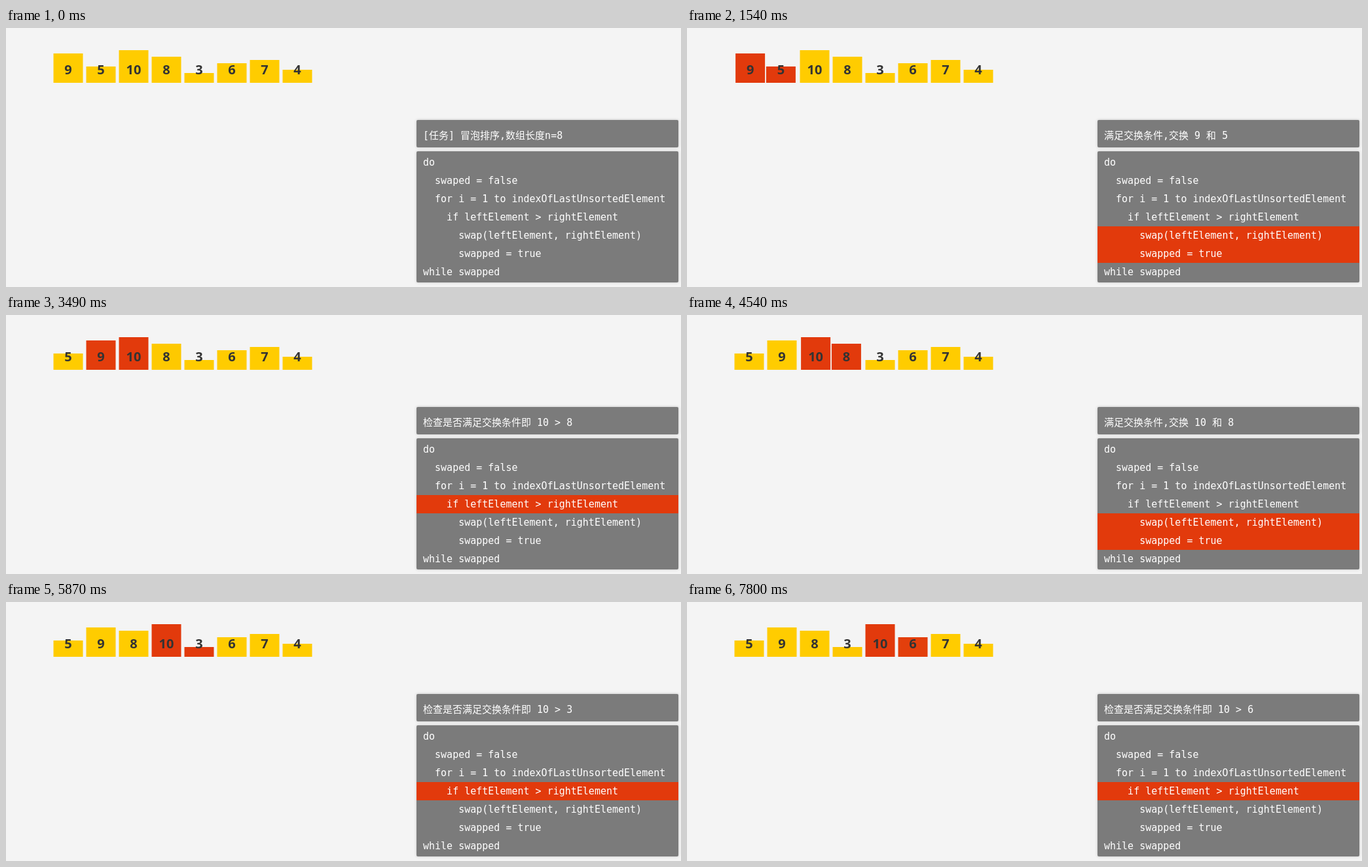
These frames come from a looping animation (1031 px wide and 397 px high, 8 s). An HTML page with a canvas:

```html
<!DOCTYPE html>
<html lang="zh-CN">
<head>
<meta charset="utf-8">
<title>冒泡排序</title>
<style>
  html, body { margin: 0; width: 100%; height: 100%; overflow: hidden; background: #f4f4f4; }
  canvas { display: block; }
</style>
</head>
<body>
<canvas id="stage" width="1031" height="397"></canvas>
<script>
const ctx = document.getElementById('stage').getContext('2d');

const LOOP = 8000;
const EASE_MS = 500;
const VALUES = [9, 5, 10, 8, 3, 6, 7, 4];
const YELLOW = [255, 204, 0];
const RED = [226, 58, 12];
const GREY = '#7b7b7b';
const MONO = '15px "DejaVu Sans Mono", "Noto Sans CJK SC", "Noto Sans CJK", monospace';
const LABEL = 'bold 20px "Open Sans", "Noto Sans", sans-serif';

const CODE = [
  'do',
  '  swaped = false',
  '  for i = 1 to indexOfLastUnsortedElement',
  '    if leftElement > rightElement',
  '      swap(leftElement, rightElement)',
  '      swapped = true',
  'while swapped'
];

// Each step eases from "start", but is only redrawn at the listed ticks.
const STEPS = [
  { kind: 'check', slot: 0, start: 400, ticks: [500, 650, 800] },
  { kind: 'swap', slot: 0, start: 1440, ticks: [1540, 1690, 1840, 1990] },
  { kind: 'check', slot: 1, start: 2400, ticks: [2440, 2590, 2740, 2890] },
  { kind: 'check', slot: 2, start: 3400, ticks: [3490, 3640, 3790] },
  { kind: 'swap', slot: 2, start: 4440, ticks: [4540, 4680, 4830, 4980] },
  { kind: 'check', slot: 3, start: 5400, ticks: [5430, 5720, 5870] },
  { kind: 'swap', slot: 3, start: 6360, ticks: [6460, 6610, 6750, 6900] },
  { kind: 'check', slot: 4, start: 7405, ticks: [7500, 7650, 7800] }
];

function ease(u) {
  u = Math.min(1, Math.max(0, u));
  return u < 0.5 ? 4 * u ** 3 : 1 - 4 * (1 - u) ** 3;
}

function mix(a, b, p) {
  return `rgb(${a.map((v, k) => Math.round(v + (b[k] - v) * p))})`;
}

function stateAt(t) {
  const bars = VALUES.map((value, i) => ({ value, pos: i, heat: 0 }));
  let message = '[任务] 冒泡排序,数组长度n=8';
  let lit = [];
  const done = STEPS.filter(s => s.ticks[0] <= t);

  done.forEach((step, n) => {
    const tick = step.ticks.filter(x => x <= t).pop();
    const p = n < done.length - 1 ? 1 : ease((tick - step.start) / EASE_MS);
    const left = bars.find(b => b.pos === step.slot);
    const right = bars.find(b => b.pos === step.slot + 1);
    if (step.kind === 'check') {
      for (const b of bars) {
        const target = b === left || b === right ? 1 : 0;
        b.heat += (target - b.heat) * p;
      }
      message = `检查是否满足交换条件即 ${left.value} > ${right.value}`;
      lit = [3];
    } else {
      left.pos += p;
      right.pos -= p;
      message = `满足交换条件,交换 ${left.value} 和 ${right.value}`;
      lit = [4, 5];
    }
  });
  return { bars, message, lit };
}

function panel(y, h) {
  ctx.save();
  ctx.shadowColor = 'rgba(0, 0, 0, 0.2)';
  ctx.shadowBlur = 4;
  ctx.fillStyle = GREY;
  ctx.beginPath();
  ctx.roundRect(627, y, 400, h, 2);
  ctx.fill();
  ctx.restore();
}

function draw(t) {
  const { bars, message, lit } = stateAt(t);
  ctx.fillStyle = '#f4f4f4';
  ctx.fillRect(0, 0, 1031, 397);

  const barX = b => 72.5 + 50 * b.pos;
  for (const b of bars) {
    ctx.fillStyle = mix(YELLOW, RED, b.heat);
    ctx.fillRect(barX(b), 84 - 5 * b.value, 45, 5 * b.value);
  }
  ctx.font = LABEL;
  ctx.textAlign = 'center';
  ctx.fillStyle = '#333';
  for (const b of bars) ctx.fillText(b.value, barX(b) + 22.5, 71);

  panel(141, 42);
  panel(189, 201);
  ctx.fillStyle = mix(RED, RED, 0);
  for (const line of lit) ctx.fillRect(627, 192 + 28 * line, 400, 28);

  ctx.font = MONO;
  ctx.textAlign = 'left';
  ctx.fillStyle = '#fff';
  ctx.fillText(message, 637, 170);
  CODE.forEach((line, i) => ctx.fillText(line, 637, 211 + 28 * i));
}

const begin = performance.now();
function frame() {
  draw((performance.now() - begin) % LOOP);
  requestAnimationFrame(frame);
}
frame();
</script>
</body>
</html>
```
